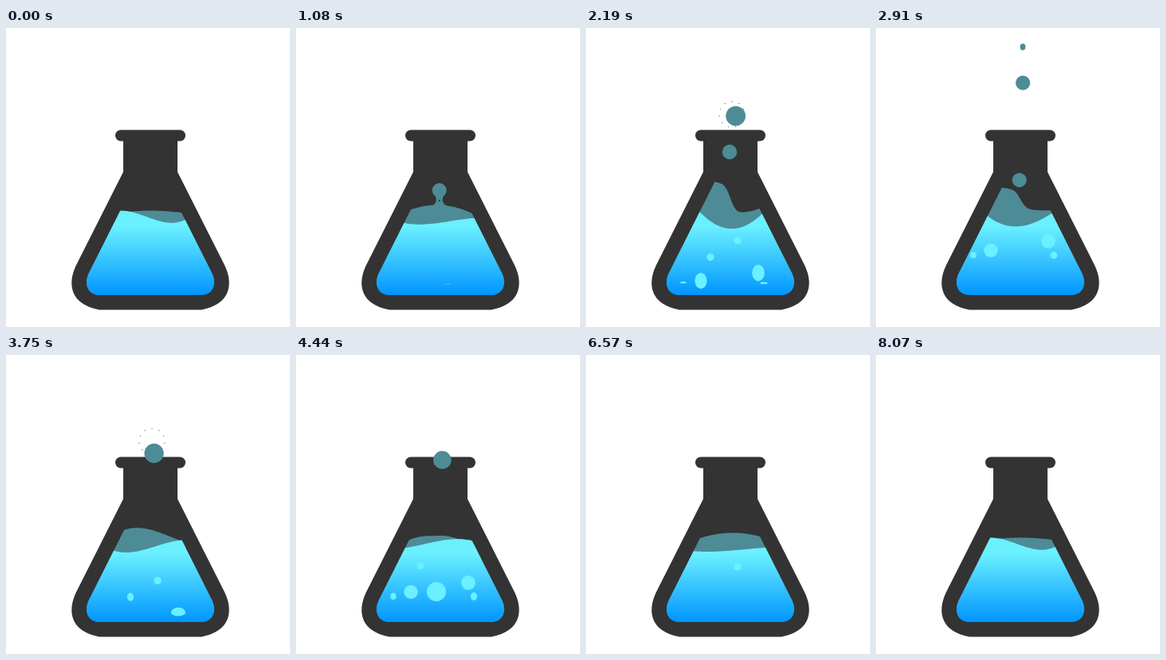
An HTML page with a canvas that plays this animation: 356x374 px, repeating every 8.1 s.

```html
<!DOCTYPE html>
<html lang="en">
<head>
<meta charset="utf-8">
<title>Bubbling flask</title>
<style>
html, body { margin: 0; width: 100%; height: 100%; overflow: hidden; background: #fff; }
canvas { display: block; width: 356px; height: 374px; }
</style>
</head>
<body>
<canvas id="stage" width="356" height="374"></canvas>
<script>
const ctx = document.getElementById('stage').getContext('2d');
const LOOP = 8100, STEP = 30;
const AXIS = 181, MOUTH = 108;
const DARK = '#333333', TEAL = '#4d8b97', CYAN = '#6bf0ff';
const DROP_SPEED = 0.12, BUBBLE_SPEED = 0.057, SWELL = 250;

const flask = new Path2D('M147 135H215V180L274.2 297C286 322 280 346 245 352.5H117C82 346 76 322 87.8 297L147 180Z');
const inside = new Path2D('M181 153.6L256.8 304C266 320 259 334 245 334H117C103 334 96 320 105.2 304Z');

const fill = ctx.createLinearGradient(0, 248, 0, 334);
fill.addColorStop(0, CYAN);
fill.addColorStop(1, '#0095ff');

// Each surface pose: height, tilt, bend, twist, surge.
const poses = [
  { t: 0, front: [237.8, 5.8, -3, -9, 0], back: [228.5, 0, 3, 0, 0] },
  { t: 1080, front: [243.5, -3.3, -2.3, 2.7, 0], back: [221.5, 2, 9.5, 0, 0] },
  { t: 2190, front: [251, 2, -23, 0, 0], back: [213, 0, -8, 0, 19] },
  { t: 3750, front: [241.3, -7.2, -2.7, 5.5, 0], back: [218.5, 5.5, 10, -5, 0] },
  { t: 5160, front: [226.5, 0, 8, 0, 0], back: [232, 0, 5, 0, 0] },
  { t: 6570, front: [244.7, -2.3, -1.4, 1, 0], back: [222.5, -1, 7, 0, 0] }
];

// Free drops: birth time and the height where they vanish.
const drops = [
  [897, MOUTH], [1232, 18], [1607, 18], [2620, MOUTH],
  [2900, MOUTH], [3660, 18], [4752, 171]
];

// Vents on the floor: x, radius, first bubble. Later bubbles come ever more slowly.
const vents = [
  [190, 4.7, 1060], [156, 4.6, 1427], [216, 9, 1765], [144, 8.7, 1969],
  [122, 4, 2105], [223, 4.5, 2105], [176, 12, 3790], [208, 5, 4840]
];
const bubbles = vents.flatMap(([x, r, first]) =>
  [0, 1, 2].map(k => ({ x, r, birth: first + 1850 * k ** 1.24 })).filter(b => b.birth < 5600));

const clamp = v => Math.max(0, Math.min(1, v));

function spline(a, b, c, d, u) {
  return b + 0.5 * u * (c - a + u * (2 * a - 5 * b + 4 * c - d + u * (3 * (b - c) + d - a)));
}

function poseAt(t) {
  const n = poses.length;
  let i = n - 1;
  while (poses[i].t > t) i--;
  const end = i + 1 < n ? poses[i + 1].t : LOOP;
  const u = (t - poses[i].t) / (end - poses[i].t);
  const [a, b, c, d] = [-1, 0, 1, 2].map(k => poses[(i + k + n) % n]);
  const mix = key => b[key].map((v, j) => spline(a[key][j], v, c[key][j], d[key][j], u));
  return { front: mix('front'), back: mix('back') };
}

function surface([level, tilt, bend, twist, surge], color) {
  ctx.beginPath();
  ctx.moveTo(90, 340);
  for (let x = 90; x <= 272; x += 2) {
    const u = Math.max(-1.25, Math.min(1.25, (x - AXIS) / 42));
    ctx.lineTo(x, level + tilt * u + bend * u * u + twist * (u ** 3 - u) + surge * Math.tanh(6 * u));
  }
  ctx.lineTo(272, 340);
  ctx.fillStyle = color;
  ctx.fill();
}

function oval(x, y, rx, ry, color) {
  ctx.beginPath();
  ctx.ellipse(x, y, rx, ry, 0, 0, Math.PI * 2);
  ctx.fillStyle = color;
  ctx.fill();
}

function stalk(x, y, w) {
  ctx.beginPath();
  ctx.moveTo(x - 13 * w, 224);
  ctx.quadraticCurveTo(x - 3 * w, 221, x - 4 * w, 214);
  ctx.lineTo(x - 5 * w, y + 6);
  ctx.lineTo(x + 5 * w, y + 6);
  ctx.lineTo(x + 4 * w, 214);
  ctx.quadraticCurveTo(x + 3 * w, 221, x + 13 * w, 224);
  ctx.fillStyle = TEAL;
  ctx.fill();
  if (w > 0.7) oval(x, 216, 1, 1.2, DARK);
}

function sparks(age) {
  if (age < 0 || age > 420) return;
  const r = 12 + 4 * clamp(age / 120);
  const size = 0.7 * clamp((520 - age) / 200);
  for (let i = 0; i < 11; i++) {
    const a = -Math.PI / 2 + i * Math.PI * 2 / 11;
    oval(183 + r * Math.cos(a), MOUTH + r * Math.sin(a), size, size, TEAL);
  }
}

function drop(t, [birth, top]) {
  const age = t - birth;
  const y = 225 - DROP_SPEED * age;
  if (age < 0 || y < top) return;
  const near = Math.exp(-(((y - 115) / 25) ** 2));
  const x = 179.7 + 4.3 * clamp((140 - y) / 30) + 3.8 * near;
  const grow = clamp((age - 110) / 70);
  const fade = clamp((y - top) / 15);
  const r = (9 + 3.5 * near) * grow * fade;
  stalk(x, y, grow * clamp((290 - age) / 107));
  oval(x, y, r, r * (1.3 - 0.3 * fade), TEAL);
}

// A bubble swells from a dome, stretches tall, then rounds off and rises.
function bubble(t, { x, r, birth }) {
  const age = t - birth;
  if (age < 0 || age > 2400) return;
  const free = Math.max(0, age - SWELL);
  const h = 1.3 * clamp(age / SWELL) - 0.3 * clamp(free / 350);
  const rx = r / Math.max(1, h), ry = r * h, low = ry * Math.min(1, h);
  const y = 314 + 1.4 * r - low - BUBBLE_SPEED * free;
  ctx.beginPath();
  ctx.ellipse(x, y, rx, ry, 0, Math.PI, Math.PI * 2);
  ctx.ellipse(x, y, rx, low, 0, 0, Math.PI);
  ctx.fillStyle = CYAN;
  ctx.fill();
}

function draw(t) {
  const { front, back } = poseAt(t);
  ctx.fillStyle = '#fff';
  ctx.fillRect(0, 0, 356, 374);
  ctx.fillStyle = DARK;
  ctx.fill(flask);
  ctx.beginPath();
  ctx.roundRect(137, 127.5, 88, 14, 7);
  ctx.fill();

  ctx.save();
  ctx.clip(inside);
  surface(back, TEAL);
  ctx.restore();

  for (const [birth, top] of drops) {
    if (top === MOUTH) sparks(t - birth - (225 - top) / DROP_SPEED);
  }
  for (const d of drops) drop(t, d);

  ctx.save();
  ctx.clip(inside);
  surface(front, fill);
  ctx.clip();
  for (const b of bubbles) bubble(t, b);
  ctx.restore();
}

const start = performance.now();
function tick() {
  const t = (performance.now() - start) % LOOP;
  draw(Math.floor(t / STEP) * STEP);
  requestAnimationFrame(tick);
}
tick();
</script>
</body>
</html>
```
